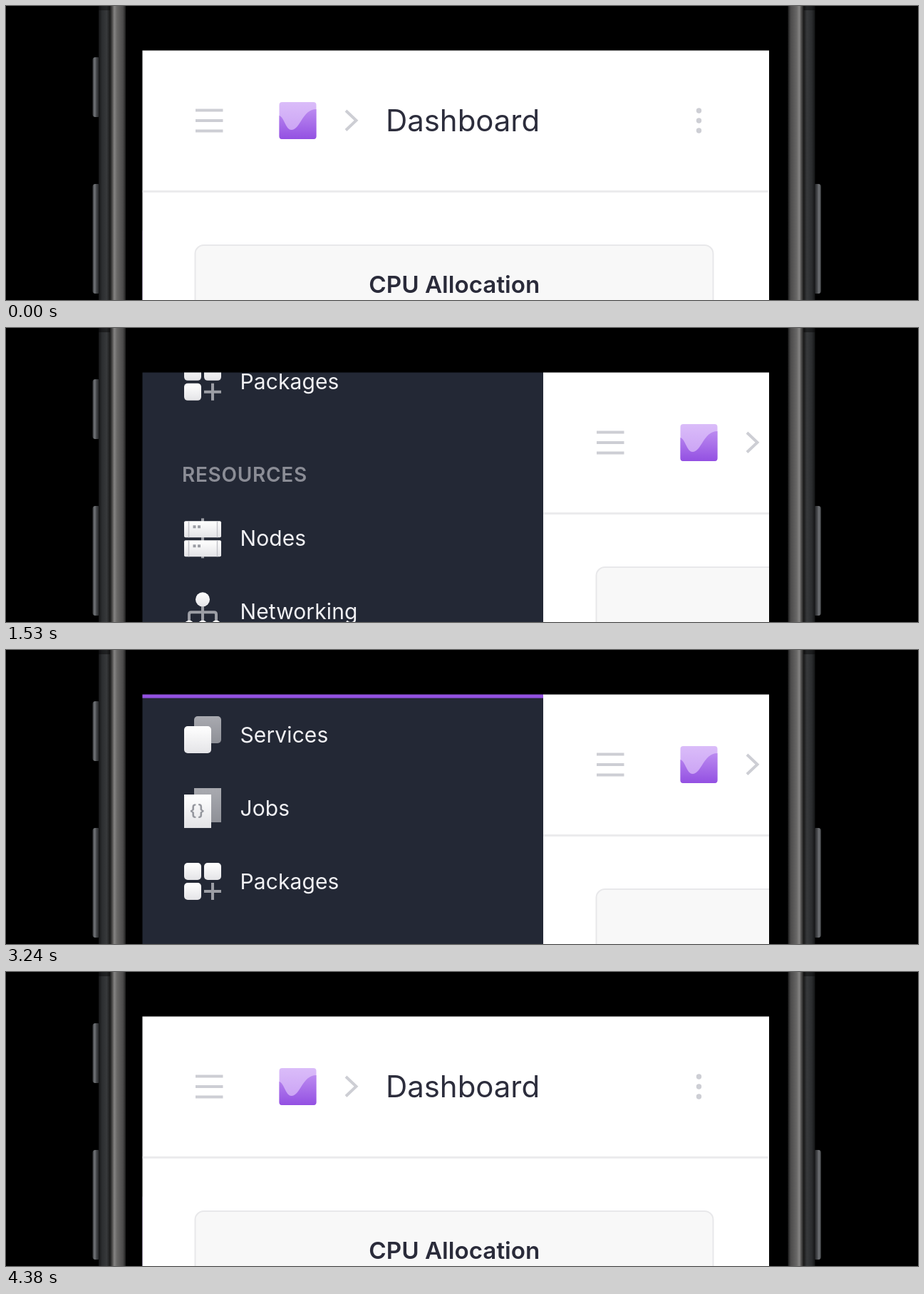
Recreate the animation shown at these times as an HTML page. Size 1280 by 413 pixels, loop 5.4 s.

```html
<!DOCTYPE html>
<html lang="en">
<head>
<meta charset="utf-8">
<title>Mobile navigation drawer</title>
<style>
  html, body { margin: 0; width: 100%; height: 100%; overflow: hidden; background: #000; }
  svg { display: block; width: 1280px; height: 413px; font-family: Inter, Roboto, sans-serif; }
  .line { fill: none; stroke: #cdced4; stroke-width: 4; }
  .grey { fill: none; stroke: #9c9ea5; stroke-width: 4; }
  .item { font-size: 30px; letter-spacing: .1px; fill: #f1f1f4; }
  .section { font-size: 28px; font-weight: 600; letter-spacing: .7px; fill: #8b8d96; }
</style>
</head>
<body>
<svg viewBox="0 0 1280 413">
  <defs>
    <clipPath id="screen"><rect x="191.5" y="62.5" width="879.5" height="351"/></clipPath>
    <linearGradient id="white" x2="0" y2="1"><stop stop-color="#fff"/><stop offset="1" stop-color="#e4e4e7"/></linearGradient>
    <linearGradient id="shade" x2="0" y2="1"><stop stop-color="#a9aab0"/><stop offset="1" stop-color="#8e9097"/></linearGradient>
    <linearGradient id="lilac" x2="0" y2="1"><stop stop-color="#dabcf9"/><stop offset="1" stop-color="#c79df3"/></linearGradient>
    <linearGradient id="violet" x2="0" y2="1"><stop stop-color="#bb8af0"/><stop offset="1" stop-color="#9350e2"/></linearGradient>
    <linearGradient id="pale" x2="0" y2="1"><stop stop-color="#dccbf0"/><stop offset="1" stop-color="#c3a3e8"/></linearGradient>
    <linearGradient id="metal">
      <stop stop-color="#141516"/><stop offset=".12" stop-color="#2b2d2f"/><stop offset=".3" stop-color="#37393b"/>
      <stop offset=".42" stop-color="#1a1a1a"/><stop offset=".5" stop-color="#4b4a49"/><stop offset=".58" stop-color="#858483"/>
      <stop offset=".68" stop-color="#686766"/><stop offset=".9" stop-color="#4b4a4a"/><stop offset="1" stop-color="#1d1d1d"/>
    </linearGradient>
    <linearGradient id="button"><stop stop-color="#303234"/><stop offset=".25" stop-color="#73767a"/><stop offset=".55" stop-color="#3f4144"/><stop offset="1" stop-color="#17181a"/></linearGradient>
    <path id="wave" d="M0 19C7 21 9 39 17 39C30 39 32 10 52 10V48Q52 52 48 52H4Q0 52 0 48Z"/>
    <g id="side">
      <rect x="121.500" y="250" width="11" height="154" rx="4" fill="url(#button)"/>
      <rect x="130" width="38" height="413" fill="url(#metal)"/>
      <rect x="130" width="16" height="6" fill="#000" opacity=".4"/>
    </g>
  </defs>

  <rect width="1280" height="413"/>
  <rect x="121.500" y="72" width="11" height="84" rx="4" fill="url(#button)"/>
  <use href="#side"/>
  <use href="#side" transform="matrix(-1 0 0 1 1265.5 0)"/>

  <g clip-path="url(#screen)">
    <g id="slider">
      <g transform="translate(-563)">
        <rect x="191" y="62" width="563.500" height="352" fill="#232835"/>
        <g id="menu">
          <rect x="191" y="62" width="563.500" height="198" fill="#1c1d28"/>
          <text x="246.500" y="154" font-size="37.900" font-weight="600" fill="#fff">Cluster Name</text>
          <path class="line" style="stroke:#757680" d="M519 137.500l9.500 9.500 9.500-9.500"/>
          <text x="247" y="197" font-size="27.700" letter-spacing=".45" fill="#6f717b">255.255.255.255</text>
          <rect x="191" y="315.500" width="563.500" height="103" fill="#9351e1"/>
        </g>
      </g>

      <rect x="191" y="62" width="881" height="352" fill="#fff"/>
      <path class="line" d="M266 146.500h38.500M266 161h38.500M266 175.500h38.500M477 147l14.500 13.800L477 174.500"/>
      <g transform="translate(383.500 135)">
        <rect width="52" height="52" rx="4" fill="url(#lilac)"/>
        <use href="#wave" fill="url(#violet)"/>
      </g>
      <text x="533" y="175.500" font-size="41.900" fill="#2c2d3c">Dashboard</text>
      <g fill="#cdced4">
        <circle cx="972.500" cy="147" r="3.700"/><circle cx="972.500" cy="161" r="3.700"/><circle cx="972.500" cy="175" r="3.700"/>
      </g>
      <rect x="191.500" y="259" width="878" height="3" fill="#ebebed"/>
      <rect x="265.500" y="336" width="727" height="120" rx="12" fill="#f8f8f8" stroke="#e8e8ea" stroke-width="2"/>
      <text x="509.300" y="403" font-size="33.200" font-weight="600" fill="#2a2b3a">CPU Allocation</text>
    </g>
  </g>
</svg>
<script>
const $ = id => document.getElementById(id);
const box = (x, y, w, h, r = 0, fill = 'white') =>
  `<rect x="${x}" y="${y}" width="${w}" height="${h}" rx="${r}" fill="url(#${fill})"/>`;
const dot = (x, y, r) => `<circle cx="${x}" cy="${y}" r="${r}" fill="url(#white)"/>`;
const grey = d => `<path class="grey" d="${d}"/>`;

// Icons are drawn around the centre of their row.
const server = y => box(-26, y, 52, 23, 2) +
  `<path d="M-19.500 ${y}v23M20.500 ${y}v23" stroke="#c3c4c9" stroke-width="1.500"/>` +
  `<path d="M-13.500 ${y + 8}h4M-7 ${y + 8}h4" stroke="#9c9ea5" stroke-width="4"/>`;

const icons = {
  Dashboard: box(-26, -26, 52, 52, 4) + '<use href="#wave" x="-26" y="-26" fill="url(#pale)"/>',
  Services: box(-12, -26, 38, 38, 5, 'shade') + box(-26, -12, 38, 38, 5),
  Jobs: box(-12, -28, 38, 48, 0, 'shade') + box(-26, -19, 38, 47) +
    '<text x="-7" y="11" text-anchor="middle" font-size="22" font-weight="600" letter-spacing="1.500" fill="#95979e">{}</text>',
  Packages: box(-26, -26, 24, 24, 5) + box(2, -26, 24, 24, 5) + box(-26, 2, 24, 24, 5) + grey('M14 2v24M2 14h24'),
  Nodes: grey('M0-28v56') + server(-24) + server(3),
  Networking: grey('M0-10v30M-19 18V4Q-19 1-16 1H16Q19 1 19 4V18') +
    dot(0, -17, 10) + dot(-19, 20, 7.5) + dot(0, 20, 7.5) + dot(19, 20, 7.5),
  Security: '<path class="grey" style="stroke-width:5" d="M-12-5V-13a12 12 0 0 1 24 0V-5"/>' +
    box(-24, -7, 48, 33, 2) + '<rect x="-24" y="12" width="48" height="14" fill="#999ba0"/>',
  Cluster: grey('M0-16V5L-19 18M0 5L19 18') + dot(0, -16, 10) + dot(-19, 19, 10) + dot(19, 19, 10),
  Settings: '<g fill="none" stroke="#f8f8f9"><circle r="17" stroke-width="10"/>' +
    '<circle r="23" stroke-width="8" stroke-dasharray="10 8.064" stroke-dashoffset="5"/></g>' +
    '<circle r="12" class="grey"/>'
};

const rowHeight = 103;
const addRows = (y, names) => names.map((name, i) =>
  `<g transform="translate(276 ${y + i * rowHeight})">${icons[name]}<text class="item" x="52.500" y="10.500">${name}</text></g>`).join('');
const section = (y, name) => `<text class="section" x="247" y="${y}">${name}</text>`;

$('menu').insertAdjacentHTML('beforeend',
  addRows(367, ['Dashboard', 'Services', 'Jobs', 'Packages']) +
  section(816.5, 'RESOURCES') + addRows(895.5, ['Nodes', 'Networking', 'Security']) +
  section(1243.5, 'SYSTEM') + addRows(1322.5, ['Cluster', 'Settings']));

const ease = u => u < .5 ? 8 * u ** 4 : 1 - 8 * (1 - u) ** 4;
const move = (t, start, length) => ease(Math.min(1, Math.max(0, (t - start) / length)));
const loop = 5400, step = 30;

function draw() {
  // The picture advances in fixed steps; the small offset absorbs clock rounding.
  const t = Math.floor((performance.now() + 1) / step) * step % loop;
  const open = 563 * (move(t, 0, 566) - move(t, 3750, 566));
  const scroll = 694 * move(t, 1170, 563) + 304.5 * move(t, 1740, 560) - 998.5 * move(t, 2925, 581);
  $('slider').setAttribute('transform', `translate(${open})`);
  $('menu').setAttribute('transform', `translate(0 ${-scroll})`);
  requestAnimationFrame(draw);
}
draw();
</script>
</body>
</html>
```
